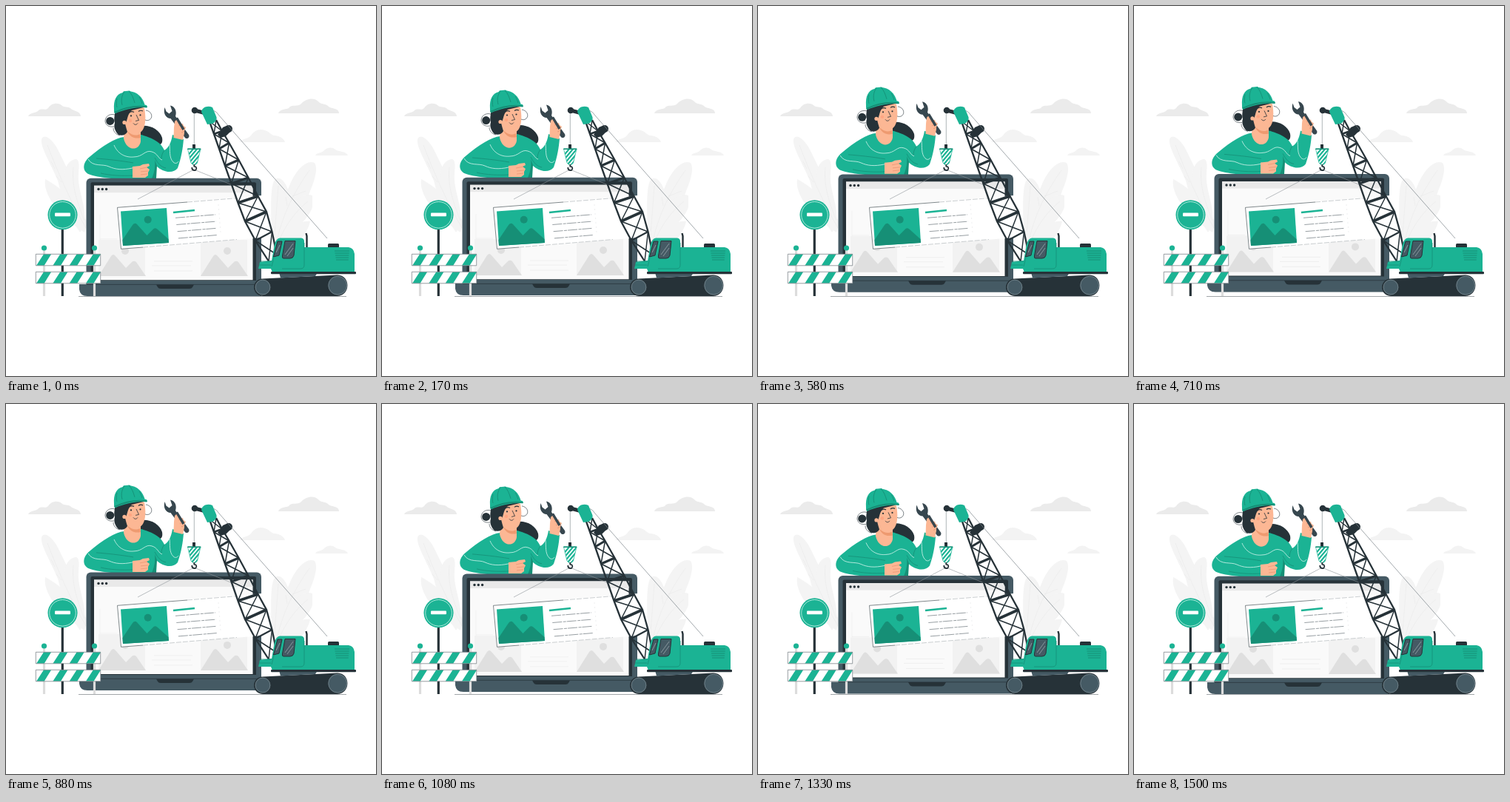
Write an HTML page with a canvas that moves like this. It is 500 by 500 pixels and loops after 1.54 s.

```html
<!DOCTYPE html>
<html lang="en">
<head>
<meta charset="utf-8">
<title>Under construction</title>
<style>
  html, body { margin: 0; width: 100%; height: 100%; overflow: hidden; background: #fff; }
  canvas { display: block; width: 500px; height: 500px; }
</style>
</head>
<body>
<canvas id="stage"></canvas>
<script>
const LOOP = 1540, STEPS = 37, RISE = 5.6, PEAK = 725;
const GREEN = '#1bb394', SHADE = '#168f76', DARK = '#263238', SLATE = '#455a64', SKIN = '#fcb794';

const canvas = document.getElementById('stage');
const ctx = canvas.getContext('2d');
const ratio = window.devicePixelRatio || 1;
canvas.width = canvas.height = 500 * ratio;

function fill(d, color) {
  ctx.fillStyle = color;
  ctx.fill(new Path2D(d));
}
function line(d, color, width = 1) {
  ctx.strokeStyle = color;
  ctx.lineWidth = width;
  ctx.stroke(new Path2D(d));
}
function box(x, y, w, h, color, r = 0) {
  ctx.fillStyle = color;
  ctx.beginPath();
  ctx.roundRect(x, y, w, h, r);
  ctx.fill();
}
function disc(x, y, r, color) {
  ctx.fillStyle = color;
  ctx.beginPath();
  ctx.arc(x, y, r, 0, 7);
  ctx.fill();
}
function ring(x, y, r, color, width) {
  ctx.strokeStyle = color;
  ctx.lineWidth = width;
  ctx.beginPath();
  ctx.arc(x, y, r, 0, 7);
  ctx.stroke();
}
function clipped(d, draw) {
  ctx.save();
  ctx.clip(new Path2D(d));
  draw();
  ctx.restore();
}

function drawBackdrop() {
  fill('M30 149C32 144 39 145 43 142C47 137 53 142 57 138C61 131 70 130 75 134C79 138 84 135 88 139C91 142 101 142 101 149Z', '#ebebeb');
  fill('M368 145C370 139 378 140 382 138C386 132 394 137 399 132C405 125 416 123 422 129C426 134 432 131 436 136C440 139 450 138 450 145Z', '#ebebeb');
  fill('M315 184C319 179 327 180 331 175C335 169 342 165 350 168C356 170 358 174 362 175C366 175 375 177 377 184Z', '#f3f3f3');
  fill('M418 202C420 198 425 199 429 196C433 191 441 190 445 194C449 197 460 196 462 202Z', '#f3f3f3');

  const leaf = '#f4f4f4';
  fill('M48 180C46 190 60 212 70 236C76 262 88 288 100 306L108 292C101 258 86 226 74 202C66 182 52 170 48 180Z', leaf);
  fill('M95 207C82 208 75 224 82 246C87 264 96 280 106 291C109 270 96 248 98 226C99 216 99 208 95 207Z', leaf);
  fill('M53 234C50 254 68 280 106 306L110 293C98 268 76 246 53 234Z', leaf);
  line('M56 188C72 230 88 265 108 300M91 218C88 244 98 270 106 290M66 220L61 210M75 238L68 230', '#e9e9e9', .6);
  fill('M417 212C407 207 392 220 383 243C371 270 360 296 360 330L372 328C383 300 405 270 411 250C417 236 422 220 417 212Z', leaf);
  fill('M366 233C357 235 357 268 360 320L369 308C376 281 385 262 381 248C378 239 372 231 366 233Z', leaf);
  fill('M414 256C398 250 377 275 362 312L366 330C380 310 407 292 414 272Z', leaf);
  fill('M411 291C396 288 380 304 368 330L378 328C394 324 408 306 411 291Z', leaf);
  line('M410 222C390 250 373 282 365 322M408 264C390 278 375 300 366 324M368 243C366 270 364 295 363 310M387 257L405 250M380 270L378 258', '#e9e9e9', .6);
  line('M98 392.5H460', '#8a9094', .8);
}

function drawHead() {
  fill('M160 162L182 166L182 183C180 196 163 197 159 179Z', SKIN);
  fill('M164 169C170 175 176 176 181 173L182 178C174 180 167 177 164 169Z', '#ee9a70');
  fill('M161 142C168 136 181 134 187 138C189 149 189 160 185 167C180 175 170 175 165 169L160 159Z', SKIN);
  fill('M147 139C148 146 145 152 147 158C145 164 148 170 152 174C157 176 162 174 164 170C163 167 162 163 161 159C165 154 163 147 170 141L186 137L164 134Z', DARK);
  disc(160, 157.5, 2.6, SKIN);
  line('M166 144.5C168 142.5 171 142.5 173 143.5M179 142.5C181 141 183 141 185 142', DARK, 1.2);
  disc(169, 148.5, 1.1, DARK);
  disc(181.5, 147.5, 1.1, DARK);
  line('M176 147L179.5 154.5L175 155.5M172 158.5C174 161 176 161 178 158.5', DARK, .8);
  disc(168, 155, 2.2, '#ffa682');

  fill('M146 140C145 127 149 119 158 117C172 111 185 121 188 135C173 133 158 136 146 143Z', GREEN);
  fill('M157 118L159 115.3L167 114.6L171 117.5L166 119Z', GREEN);
  fill('M146 141C158 133.5 176 131 190 134L191 137C176 136 160 140 147 145.5Z', GREEN);
  line('M146.5 144C160 137.5 176 134.5 190.5 136.5', SHADE, 2);
  line('M157 134C155 126 157 120 160 116M174 131C172 124 170 119 166 115M150 125C149 130 149 134 150 137M180 123C182 126 183 129 184 132', SHADE, .9);

  disc(140.7, 155.5, 5.5, DARK);
  line('M147 147C139 145 134 150 134 156C135 162 140 164 146 163M145 165C145 170 149 174 154 175M189 141C196 142 199 149 195 153C193 155 190 155 188 154', DARK, .6);
}

function drawWoman() {
  fill('M184 162C196 161 208 168 211 178C213 189 205 190 196 185C190 180 184 178 179 174Z', DARK);
  fill('M160 177C148 178 130 189 114 203C102 212 103 225 114 228C130 233 150 234 203 236L203 216C212 225 226 227 232 219C237 205 239 192 240 180L225 174C223 186 219 192 214 195C210 186 203 180 183 174Z', GREEN);
  fill('M201 208L204 216L203 233H197C201 224 202 216 201 208Z', SHADE);
  line('M122 206C135 207 155 209 172 212M128 226C140 229 157 230 172 229M201 205C205 213 210 218 216 219M214 195C211 199 210 203 210 207', SHADE, .8);
  line('M146 188C152 202 164 205 173 204C185 204 188 194 197 197C205 199 206 207 211 208M111 207C117 218 131 213 139 217C148 221 157 222 171 219M221 187C222 195 220 205 226 211C229 214 232 212 233 210', '#d5f5ec', .8);
  drawHead();

  fill('M214.5 137C212 145 216 152 222.5 152L241.5 177.5C244 181 249 178 247 174L229 149C231 143 229 136 222 134.5L224.5 142L220.5 145.5L216.5 142.5Z', '#37474f');
  fill('M226.5 178L227 164L228 156L231 153L233 155L234 160L239 159L240 162L243 164L241 169L241 172L239 181Z', SKIN);
  line('M233 162L238 160M235 167L241 164M237 171L241 169', '#e99170', .8);
  fill('M229 152L232 150.5L241.5 166L238.5 168Z', '#37474f');
  fill('M171 217L181 216L185 214L193 213L194 216L190 218L194 221L192 225L192 229L188 232H171Z', SKIN);
  line('M181 220L191 218M182 224L192 223M182 228L191 227', '#e99170', .7);
}

function placeholder(x) {
  box(x, 316, 63, 49, '#f2f2f2');
  disc(x + 36, 331, 5, '#dfdfdf');
  fill(`M${x} 365L${x + 17} 338Q${x + 20} 334 ${x + 23} 338L${x + 37} 354L${x + 45} 346Q${x + 48} 343.5 ${x + 51} 346L${x + 64} 365Z`, '#dfdfdf');
}

function drawLaptop() {
  box(108.5, 232.7, 236.5, 144, SLATE, [6, 6, 0, 0]);
  box(114.5, 238.2, 223.5, 136, DARK, 2);
  box(119, 242.7, 214.5, 127.5, '#fafafa');
  box(119, 242.7, 214.5, 9.5, '#e9e9e9');
  for (let i = 0; i < 3; i++) disc(125 + i * 5.3, 247.6, 1.7, DARK);
  line('M127 282V316M127 315H150', '#ececec', .7);
  placeholder(125);
  placeholder(263);
  line('M200 345H252M197 351H250M200 358H252', '#ececec', .8);
  fill('M99 376V383Q100 392 110 392H345V376Z', SLATE);
  box(108.5, 371, 236.5, 5.5, SLATE);
  line('M109 376.4H345', DARK, .7);
  fill('M203 376.5H254L252 380Q251 382 248 382H209Q206 382 205 380Z', DARK);
}

function drawCard() {
  line('M178 261L254 221L306 242', '#8b9397', .6);
  fill('M150 272L352 255.5L358 312L155 328.5Z', '#fff');
  line('M245 265L150.5 272.3L155.5 328.3L185 326', '#4a555a', .7);
  ctx.setLineDash([7, 2]);
  line('M185 326L312 315.5M245 265L310 259.8', '#a7adb0', .6);
  ctx.setLineDash([2, 4]);
  line('M287 268L290 306', '#e3e5e6', .6);
  ctx.setLineDash([]);
  fill('M155 277.5L217 273L220 320L158 324Z', GREEN);
  fill('M158 324L157.5 316L171 296Q174 292 177 295L190.5 310L199 301.5Q202 299 205 302L219.5 315L220 320Z', SHADE);
  disc(191.7, 288.7, 5, SHADE);
  line('M226 279L255 276', GREEN, 2.4);
  ctx.setLineDash([13, 1.5, 4, 1]);
  for (let i = 0; i < 4; i++) {
    const y = 286.3 + i * 9.2;
    line(`M${229 + i * 1.3} ${y}L${283 + i * .8} ${y - 4.4}`, '#6b757a', .7);
  }
  ctx.setLineDash([]);
}

function drawHook() {
  line('M254.3 143V188', '#7a8388', .6);
  box(252, 187, 4, 7, DARK);
  const block = 'M245.5 193H263L258.5 212Q254.3 218 250 212Z';
  fill(block, '#fff');
  clipped(block, () => {
    for (let x = 232; x < 275; x += 5.2) line(`M${x} 218L${x + 22} 192`, GREEN, 2.2);
  });
  line(block, GREEN, .7);
  box(245, 192.5, 18.5, 1.6, SHADE, 1);
  line('M254.3 214V217.5M251.3 218C251 223 257 223.5 257.3 219.5C257.3 217.5 255.5 216.5 254 217', DARK, 1.8);
}

function drawBoom() {
  const left = [[275, 156], [281, 173], [288, 193], [296, 216], [304.5, 240], [313.5, 266], [323, 291], [337, 317], [355, 345]];
  const right = [[284, 154], [292, 169], [301.5, 185], [314.5, 208], [327.5, 232], [340.5, 257], [352, 278], [359.5, 305], [366, 336]];
  for (let i = 0; i < 8; i++) {
    line(`M${left[i]}L${right[i + 1]}M${right[i]}L${left[i + 1]}`, DARK, 1.5);
    if (i) line(`M${left[i]}L${right[i]}`, DARK, i === 7 ? 2 : 2.6 + i * .2);
  }
  line('M' + left.join('L'), DARK, 2.3);
  line('M' + right.join('L'), DARK, 2.3);

  line('M255 141L270 145', DARK, 5);
  disc(255, 141, 4.3, DARK);
  fill('M286 174L293 164L300 161L304 169L297 176L290 178Z', DARK);
  disc(301, 166, 5, DARK);
  line('M281 141.5Q285 143 288 148L434 314', '#7a8388', .7);
  fill('M264 143C265 137 272 134 279 137L284 149C286 153 283 157 279 159L272 160Z', GREEN);
}

function drawCrane() {
  fill('M347 368.5L448 363.5C466 364 466 391 448 392H347C331 391 331 369 347 368.5Z', DARK);
  fill('M369 360H421L418 365L371 367.5Z', SLATE);
  for (const [x, y, r] of [[347, 380, 10.3], [448.2, 377.6, 12.8]]) {
    disc(x, y, r, SLATE);
    ring(x, y, r - .4, '#7f8e95', .7);
  }
  drawBoom();

  box(435, 321, 15, 6, DARK, 1.5);
  line('M406.5 327V311L405.5 307', DARK, 2.4);
  fill('M398 326H463Q470 327 471 335V360H398Z', GREEN);
  fill('M341 355L343 346L359 344L363 322Q365 314 370 313.5H399Q403 314 403 318V360H360L358 355Z', GREEN);
  line('M403 320V350Q403 355 398 355H373M359 345H343M362 340L359 352M342 350H358', SHADE, .8);
  fill('M367 318H373L369 337L361.5 339Z', SLATE);
  line('M367 318H373L369 337L361.5 339Z', DARK, 1);
  fill('M377 317.5H391L389 337Q388 341 384 341H375Q373 341 373.4 338Z', SLATE);
  line('M377 317.5H391L389 337Q388 341 384 341H375Q373 341 373.4 338Z', DARK, 1);
  line('M388 321L377 336M388 327L380 338M370 323L365 333', '#a5b1b6', .7);
  for (let i = 0; i < 5; i++) line(`M${444 + i * .5} ${331 + i * 3}H${464 - i * .3}`, SHADE, 1);
  box(358, 359, 115, 3.2, DARK, 1);
}

function plank(y) {
  box(40, y, 88, 15.5, '#fff');
  clipped(`M40 ${y}H128V${y + 15.5}H40Z`, () => {
    for (let x = 40; x < 130; x += 22.3) {
      fill(`M${x + 11} ${y}H${x + 21.2}L${x + 11.6} ${y + 15.5}H${x + 1}Z`, GREEN);
    }
  });
  line(`M40.3 ${y}H127.7V${y + 15.5}H40.3Z`, '#6b757a', .7);
}

function drawBarrier() {
  box(74.7, 300, 3.2, 92, DARK);
  disc(76.5, 282.3, 20, GREEN);
  ring(76.5, 282.3, 17.8, '#e8fff8', .7);
  box(66, 279.5, 21, 4.8, '#fff', 1);
  for (const x of [51.5, 119.5]) {
    box(x - 1.6, 329, 3.2, 63, '#dcdcdc');
    disc(x, 327, 3.6, GREEN);
  }
  plank(335.3);
  plank(359.3);
}

function liftAt(time) {
  const step = Math.floor((time % LOOP) / LOOP * STEPS + .2);
  const t = step * LOOP / STEPS;
  return -RISE * (1 + Math.cos((t - PEAK) / LOOP * 2 * Math.PI)) / 2;
}

const start = performance.now();

function render() {
  ctx.setTransform(ratio, 0, 0, ratio, 0, 0);
  ctx.fillStyle = '#fff';
  ctx.fillRect(0, 0, 500, 500);
  drawBackdrop();
  ctx.save();
  ctx.translate(0, liftAt(performance.now() - start));
  drawWoman();
  drawLaptop();
  ctx.restore();
  drawCard();
  drawHook();
  drawCrane();
  drawBarrier();
  requestAnimationFrame(render);
}
render();
</script>
</body>
</html>
```
